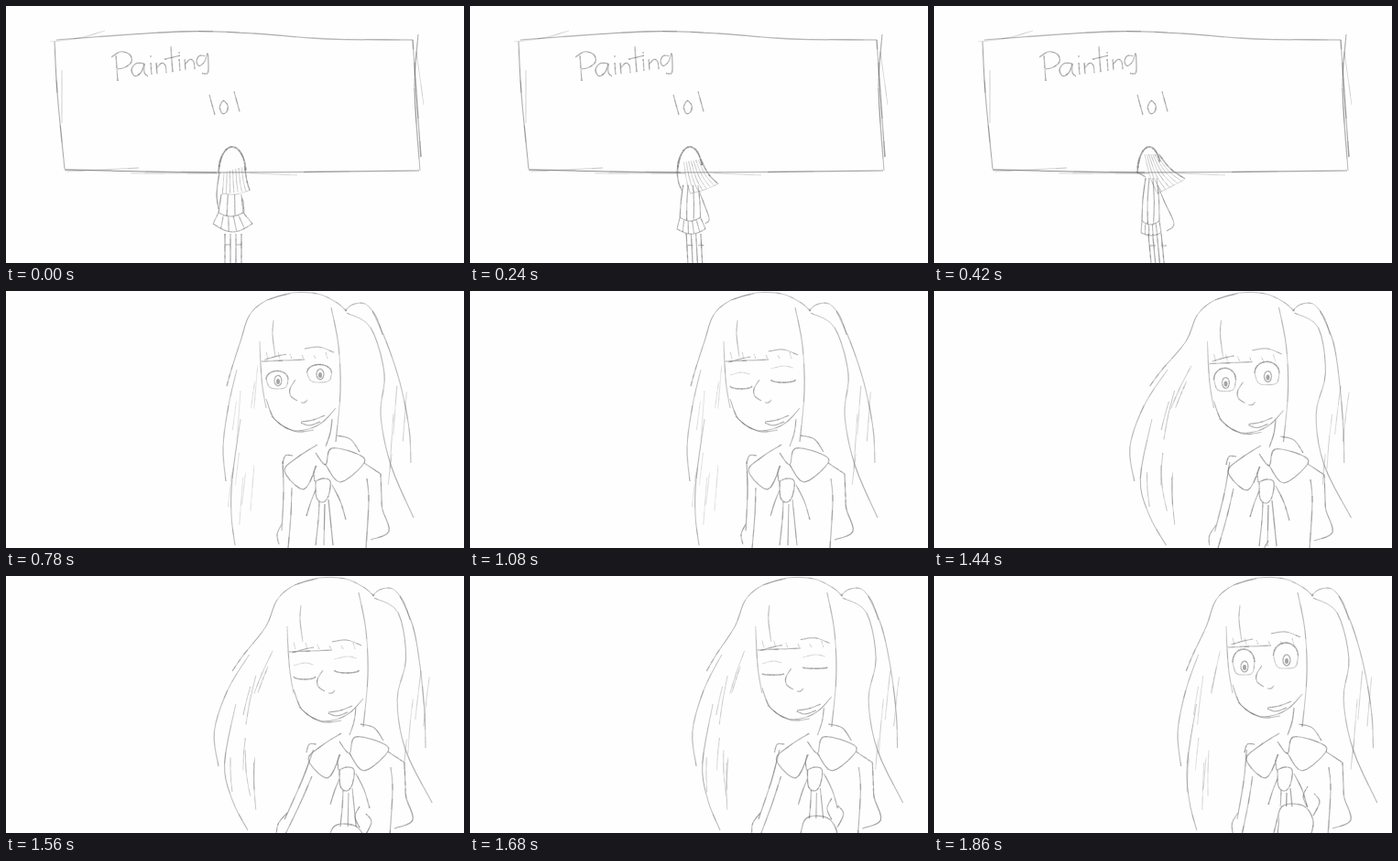
Animation, 500 px wide and 281 px high, one loop 1.92 s. Source, as an HTML page with a canvas:

```html
<!DOCTYPE html>
<html lang="en">
<head>
<meta charset="utf-8">
<title>Sketch</title>
<style>
html, body { margin: 0; width: 100%; height: 100%; overflow: hidden; background: #fefefe; }
canvas { display: block; width: 500px; height: 281px; }
</style>
</head>
<body>
<canvas id="stage"></canvas>
<script>
const LOOP = 1920, STEP = 60, PAPER = '#fefefe';
const cv = document.getElementById('stage'), g = cv.getContext('2d');
const dpr = window.devicePixelRatio || 1;
cv.width = 500 * dpr;
cv.height = 281 * dpr;
g.scale(dpr, dpr);

let seed = 1;
function rnd() {
  seed = (seed * 16807) % 2147483647;
  return seed / 2147483647;
}
const mix = (a, b, k) => a + (b - a) * k;
// "x y,x y;x y,x y" -> list of strokes
const parse = s => s.split(';').map(l => l.split(',').map(p => p.trim().split(' ').map(Number)));

// value of a keyed track [[step, value], ...]
function track(keys, n) {
  let i = 0;
  while (i < keys.length - 2 && n > keys[i + 1][0]) i++;
  const [[n0, a], [n1, b]] = [keys[i], keys[i + 1]];
  return mix(a, b, Math.max(0, Math.min(1, (n - n0) / (n1 - n0))));
}

// smooth curve through the points
function smooth(pts) {
  const out = [pts[0]];
  for (let i = 0; i < pts.length - 1; i++) {
    const a = pts[i - 1] || pts[i], b = pts[i], c = pts[i + 1], d = pts[i + 2] || c;
    for (let t = 0.2; t < 1.01; t += 0.2) {
      out.push([0, 1].map(j => b[j] + 0.5 * t * (c[j] - a[j] +
        t * (2 * a[j] - 5 * b[j] + 4 * c[j] - d[j] + t * (3 * b[j] - a[j] - 3 * c[j] + d[j])))));
    }
  }
  return out;
}

// pencil line whose pressure varies along the way
function line(pts, w = 1, a = 0.7) {
  const p = smooth(pts);
  for (let i = 1; i < p.length; i++) {
    g.strokeStyle = `rgba(105,105,105,${a * (0.6 + 0.4 * rnd())})`;
    g.lineWidth = w * (0.9 + 0.4 * rnd());
    g.beginPath();
    g.moveTo(...p[i - 1]);
    g.lineTo(...p[i]);
    g.stroke();
  }
}
const draw = (list, w, a) => list.forEach(l => line(l, w, a));
function arc(x, y, rx, ry, from, to, w, a) {
  const pts = [];
  for (let i = 0; i <= 8; i++) {
    const t = mix(from, to, i / 8) * Math.PI;
    pts.push([x + rx * Math.cos(t), y + ry * Math.sin(t)]);
  }
  line(pts, w, a);
}
function at(x, y, paint) {
  g.save();
  g.translate(x, y);
  paint();
  g.restore();
}

// ---- the painting ----
const board = parse('55 37,190 28,270 30,350 36,444 37;53 39,56 95,64 178;64 179,230 182,451 180;444 37,449 110,453 165;450 31,446 90,452 180');
const ghost = parse('48 39,80 35,108 27;61 70,61 128;66 181,145 177;136 183,235 183;266 183,318 185;448 50,456 108');
const glyphs = {
  P: parse('0 -26,1 -12,2 2;-5 -24,5 -30,15 -27,17 -19,10 -13,2 -11'),
  a: parse('13 -15,5 -15,0 -8,4 -1,11 -6,14 -15,14 -5,18 -1'),
  i: parse('0 -13,1 0;0 -21,0 -19'),
  n: parse('0 -12,1 0;1 -7,6 -12,10 -9,11 -1'),
  t: parse('0 -28,1 -12,2 0;-7 -14,10 -18'),
  g: parse('9 -14,3 -14,0 -8,3 -3,9 -8,12 -17,13 -3,12 5,6 5'),
  l: parse('0 -22,3 -11,6 0'),
  o: parse('0 -7,4 -14,9 -9,8 -2,3 0,0 -7')
};
function write(word, xs, base) {
  xs.forEach((x, i) => at(x, base - 0.13 * (x - xs[0]), () => draw(glyphs[word[i]], 1.1, 0.7)));
}

// ---- small figure, k = 0 from behind, 1 turned aside ----
function figure(k) {
  const cx = mix(247, 235, k);
  arc(cx, 184, mix(15, 13, k), 30, 1.02, mix(1.95, 1.85, k), 1.6, 0.85);
  line([[cx - 14, 182], [mix(230, 226, k), mix(205, 184, k)], [mix(232, 231, k), mix(222, 187, k)]], 1.2, 0.75);
  for (let i = 0; i < 8; i++) {
    const tip = [mix(236 + 4.3 * i, 244 + 4.3 * i, k), mix(206 - 0.6 * i, 205 - 2.3 * i, k)];
    const root = [mix(238 + 3.2 * i, 230 + 2.2 * i, k), mix(182 - i, 162, k)];
    line([root, [mix(root[0], tip[0], 0.45), mix(root[1], tip[1], 0.6)], tip], i === 7 ? 1.2 : 0.8, i === 7 ? 0.75 : 0.5);
  }
  line([[mix(236, 244, k), 205], [mix(251, 260, k), mix(206, 197, k)], [mix(267, 273, k), mix(201, 190, k)]], 0.8, 0.45);

  const waist = u => [mix(232 + 27 * u, 227 + 19 * u, k), mix(226, 235, k) + 4 * Math.sin(Math.PI * u)];
  const hem = u => [mix(226 + 43 * u, 226 + 22 * u, k), mix(238, 248, k) + mix(9, 3, k) * Math.sin(Math.PI * u)];
  const us = [0, 0.2, 0.4, 0.6, 0.8, 1];
  for (let i = 0; i < 4; i++) {
    const top = [mix(235 + 7.3 * i, 231 + 4 * i, k), mix(206, 188, k)], end = waist(i / 3);
    line([top, [mix(top[0], end[0], 0.5) + (i < 2 ? -1 : 1) * k, mix(top[1], end[1], 0.5)], end]);
  }
  line(us.map(waist));
  line(us.map(hem));
  us.forEach(u => line([waist(u), hem(u)], 0.9, 0.65));
  // trailing arm
  line([[mix(258, 244, k), mix(210, 196, k)], [mix(259, 252, k), 215], [mix(260, 262, k), mix(226, 238, k)], [mix(260, 254, k), mix(227, 246, k)]]);
  for (let i = 0; i < 4; i++) {
    const x = 239 + 6 * i, turned = 234 + 4.7 * i;
    line([[mix(x, turned, k), 249], [mix(x, turned + 1.5, k), 265], [mix(x, turned + 3, k), 281]], 1.1, 0.75);
  }
  for (const x of [239, 251]) line([[x - 3 * k, 261 + k], [x + 6 - 3 * k, 261 + k]]);
}

function wide(n) {
  draw(board, 1.1, 0.75);
  draw(ghost, 0.8, 0.4);
  write('Painting', [120, 137, 158, 164, 180, 189, 195, 208], 80);
  write('lol', [222, 233, 249], 119);
  figure(Math.min(n / 7, 1.1));
}

// ---- close-up: still hair, bent by the wind ----
const headHair = parse('277 55,278 80,280 105,284 128;288 9,312 2,340 3,360 12,372 22;355 18,363 60,365 110,360 165;292 32,291 48,294 72');
const leftHair = parse('310 3,285 10,266 26,256 55,246 86,241 104;252 86,243 125,237 170,240 208;256 140,247 205,246 245,250 278');
const rightHair = parse('370 22,378 15,392 14,404 28,411 48;400 22,415 55,430 100,440 150,442 188;372 24,398 40,413 90,409 135,420 190,445 248');
function blow(list, force) {
  return list.map(l => l.map(([x, y]) => {
    const u = Math.max(0, y / 281 - 0.18) / 0.82;
    return [x - force * Math.sin(Math.PI * 0.88 * u), y];
  }));
}
// loose short strands between the outer edge and the face
function wisps(count, x, spread, force, a) {
  for (let i = 0; i < count; i++) {
    const x0 = x + spread * rnd(), y0 = 80 + 125 * rnd(), len = 25 + 35 * rnd(), f = force * (0.4 + 0.6 * rnd());
    const strand = [0, 0.5, 1].map(t => [x0 - 4 * t, y0 + len * t]);
    draw(blow([strand], f), 0.9, a);
  }
}

const shirt = parse('340 168,318 182,304 197,325 217,339 191;338 177,349 190,355 172,383 178,391 188,365 209,349 190;361 158,376 162,386 176;391 188,400 194,409 200;313 180,305 180,302 189;356 140,354 155,349 170;338 191,336 199,337 208');
const ribbon = parse('338 208,346 205,354 208,352 224,346 231,339 226,338 208;342 230,341 250,338 278;348 233,347 278;352 228,357 278;356 212,365 230,371 250;338 218,333 230,328 246');
const rightArm = parse('409 200,410 225,411 239,418 263,398 272;394 205,396 230,393 281');
const leftArm = parse('302 186,303 220,301 262;301 255,296 266,298 277;312 215,311 245,308 281');
const hand = parse('333 281,337 265,342 249,354 245,369 249,377 264,374 281;371 226,366 237,371 249;378 234,384 243,377 258');
const face = parse('284 118,293 140,312 152,330 151,346 143,360 128;290 137,303 148,318 154,336 152');
const nose = parse('316 97,310 107,311 115,318 120;322 122,326 122,329 119');
const mouth = parse('322 143,335 141,348 136;322 144,331 147,343 143');
const brows = parse('282 74,296 70,306 68;326 62,342 60,358 66');

const faceX = [[18, 0], [22, 13], [26, 30], [31, 42]];
const faceY = [[18, 0], [22, -1], [26, 6], [31, 1]];
const bodyX = [[18, 0], [22, 8], [26, 26], [31, 37]];
const bodyY = [[18, 0], [22, -2], [26, 4], [31, 4]];
const gust = [[18, 0], [22, 50], [26, 40], [31, 13]];
const elbow = [[22, 0], [26, 26], [31, 8]];
const reach = [[22, 70], [26, 22], [31, 0]];
const open = [[13, 0.7], [17, 0], [18, 0], [22, 1], [24, 0.9], [26, 0], [28, 0.1], [30, 1]];

function eye(x, y, w, o) {
  const end = y + 6 - 11 * o, mid = y + 9 - 28 * o;
  arc(x, end, w, end - mid, 1, 2, 1.3, 0.8);
  if (o < 0.3) {
    line([[x - w, y - 6], [x, y - 9], [x + w * 0.8, y - 7]], 0.8, 0.35);
    return;
  }
  g.save();
  g.beginPath();
  g.rect(x - 15, mid, 30, 40);
  g.clip();
  arc(x + 1, y, 4, 5 + o, 0, 2, 1.1, 0.75);
  g.fillStyle = 'rgba(105,105,105,0.6)';
  g.beginPath();
  g.ellipse(x + 1, y + 1, 2, 3, 0, 0, Math.PI * 2);
  g.fill();
  g.restore();
  line([[x - w, end], [x - w * 0.7, y + 7], [x, y + 9], [x + w * 0.8, y + 7], [x + w, end]], 0.9, 0.5);
}

function portrait(n) {
  const o = track(open, n), wind = track(gust, n);
  at(track(faceX, n), 0, () => {
    draw(headHair, 1, 0.55);
    draw(blow(leftHair, wind), 1, 0.6);
    draw(blow(rightHair, wind * 0.35), 1, 0.55);
    wisps(9, 246, 30, wind, 0.25 + wind / 200);
    wisps(4, 415, 24, wind * 0.35, 0.35);
  });
  at(track(faceX, n), track(faceY, n), () => {
    draw(face, 1, 0.65);
    draw(nose, 1.1, 0.65);
    draw(mouth, 1.1, 0.65);
    line([[279, 77], [302, 76], [326, 75]], 1.1, 0.65);
    for (let x = 284; x < 360; x += 13) line([[x, 66 + 5 * rnd()], [x + 2, 74]], 0.9, 0.4);
    at(0, 4 * (1 - o), () => draw(brows, 1, 0.6));
    eye(296, 98, 12, o);
    eye(342, 91, 13.5, o);
  });
  at(track(bodyX, n), track(bodyY, n), () => {
    const bend = track(elbow, n);
    draw(shirt, 1.1, 0.68);
    draw(ribbon, 1.1, 0.68);
    draw(rightArm, 1.1, 0.68);
    draw(leftArm.map(l => l.map(([x, y]) => [x - bend * (y - 205) / 65, y])), 1.1, 0.68);
    at(-track(reach, n) / 2, track(reach, n), () => {
      g.fillStyle = PAPER;
      g.fillRect(340, 248, 32, 60);
      draw(hand, 1.1, 0.68);
    });
  });
}

function frame(now) {
  const n = Math.floor((now % LOOP) / STEP);
  seed = 77;
  g.fillStyle = PAPER;
  g.fillRect(0, 0, 500, 281);
  if (n < 10) wide(n); else portrait(n);
  requestAnimationFrame(frame);
}
requestAnimationFrame(frame);
</script>
</body>
</html>
```
